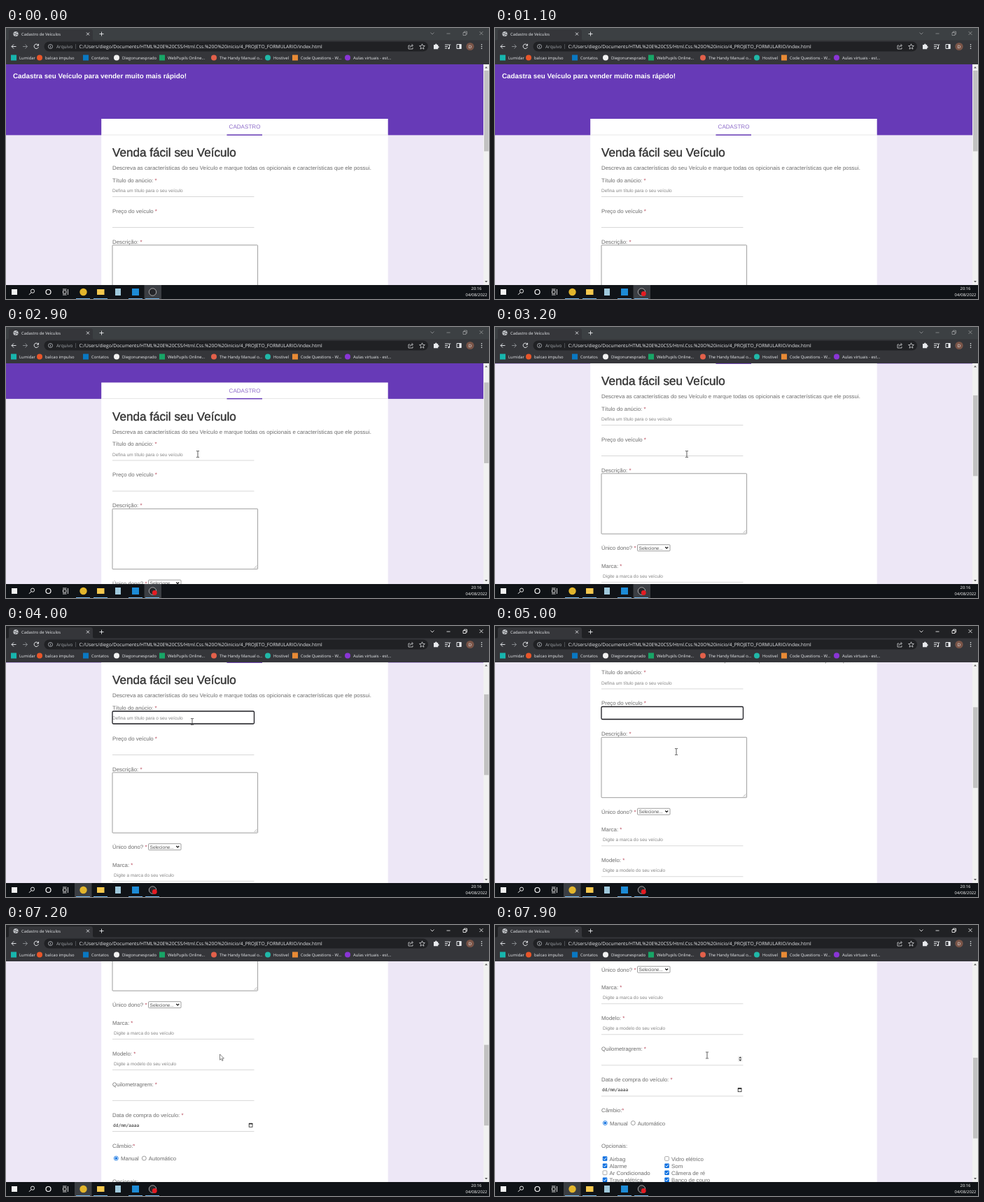
An HTML page that plays this animation: 690 by 388 pixels, repeating every 8000 ms.

```html
<!DOCTYPE html>
<html lang="pt">
<head>
<meta charset="utf-8">
<title>Cadastro de Veículos</title>
<style>
html, body { margin: 0; height: 100%; overflow: hidden; background: #202124; }
svg { display: block; width: 690px; height: 388px; text-rendering: geometricPrecision; }
text { white-space: pre; }
.ui { font-family: "Open Sans", sans-serif; }
.page { font-family: "Liberation Sans", Arial, sans-serif; }
.mono { font-family: "DejaVu Sans Mono", monospace; }
</style>
</head>
<body>
<svg id="stage" viewBox="0 0 690 388"></svg>
<script>
const rect = (x, y, w, h, fill, more = '') =>
  `<rect x="${x}" y="${y}" width="${w}" height="${h}" fill="${fill}" ${more}/>`;
const disc = (x, y, r, fill, more = '') =>
  `<circle cx="${x}" cy="${y}" r="${r}" fill="${fill}" ${more}/>`;
const line = (d, color, width = 1, more = '') =>
  `<path d="${d}" fill="none" stroke="${color}" stroke-width="${width}" ${more}/>`;
const shape = (d, fill, more = '') => `<path d="${d}" fill="${fill}" ${more}/>`;
// cy is the middle of the capitals
const text = (x, cy, size, fill, str, more = '') =>
  `<text x="${x}" y="${cy + size * 0.36}" font-size="${size}" fill="${fill}" ${more}>${str}</text>`;

const PURPLE = '#673ab7', LIGHT = '#e8eaed', TOOLBAR = '#35363a', BLUE = '#0b6fe0';
const INK = '#6c6c6c', BODY = 7.88, SMALL = 6.53;

// ---- form page, drawn at scroll 0 ----
const body = (x, y, str) => text(x, y, BODY, INK, str);
const label = (y, str) => body(152, y, `${str}<tspan fill="#b8485a"> *</tspan>`);
const rule = y => rect(152, y - 0.4, 202.5, 0.8, '#cfcfcf');
const hint = (x, y, str) => text(x, y, SMALL, '#858585', str);

function check(x, y, on, str) {
  const box = on
    ? rect(x - 3.2, y - 3.2, 6.5, 6.5, BLUE, 'rx="1"') +
      line(`M${x - 2} ${y}l1.5 1.6 2.7-3.2`, '#fff', 1)
    : rect(x - 2.9, y - 2.9, 5.8, 5.8, '#fff', 'rx="1" stroke="#767676" stroke-width=".6"');
  return box + body(x + 6.5, y + 0.3, str);
}

const spinner = (id, y) => `<g id="${id}">` +
  rect(347, y - 4, 6.5, 8, '#efefef') +
  shape(`M348.2 ${y - 0.9}h4.2l-2.1-2.4zM348.2 ${y + 0.9}h4.2l-2.1 2.4z`, '#444') + '</g>';
const ring = (id, y) => rect(152, y, 202.5, 18, 'none',
  `id="${id}" rx="1.5" stroke="#1c1c22" stroke-width="1.3"`);

const form =
  rect(0, 52, 682, 900, '#ede7f6') +
  rect(0, 52, 682, 101.4, PURPLE) +
  text(10, 68, 9.83, '#fff', 'Cadastra seu Veículo para vender muito mais rápido!', 'font-weight="700"') +
  rect(136.2, 130, 409.5, 900, '#fff') +
  rect(136.2, 152.7, 409.5, 0.7, '#ddd') +
  text(341, 141.3, 8.08, PURPLE, 'CADASTRO', 'text-anchor="middle" opacity=".75"') +
  rect(315.5, 152.4, 50.5, 1.5, PURPLE) +
  text(152, 178, 17.1, '#333', 'Venda fácil seu Veículo', 'stroke="#333" stroke-width=".4"') +
  body(152, 200.3, 'Descreva as características do seu Veículo e marque todas os opicionais e características que ele possui.') +
  label(218, 'Título do anúcio:') + hint(152, 232.8, 'Defina um título para o seu veículo') + rule(241.5) +
  label(262, 'Preço do veículo') + rule(285.5) +
  label(306, 'Descrição:') +
  rect(152, 310.8, 207.6, 86.4, '#fff', 'rx=".8" stroke="#858585" stroke-width=".8"') +
  line('M354.5 396l4-4M357 396l1.5-1.5', '#777', 0.5) +
  label(417.5, 'Único dono?') +
  rect(203.5, 412.7, 46.5, 9, '#fff', 'rx="1" stroke="#767676" stroke-width=".7"') +
  text(205.5, 417.5, 6.6, '#555', 'Selecione...') +
  line('M243.2 416l2 2 2-2', '#111', 1.1) +
  label(443, 'Marca:') + hint(154, 457.3, 'Digite a marca do seu veículo') + rule(466.3) +
  label(487, 'Modelo:') + hint(154, 501.3, 'Digite a modelo do seu veículo') + rule(510.3) +
  label(530.8, 'Quilometragrem:') + rule(554.3) +
  label(574.8, 'Data de compra do veículo:') +
  text(153, 589.5, 6.2, '#222', 'dd/mm/aaaa', 'class="mono"') +
  rect(347.2, 587.4, 4.8, 4.8, 'none', 'stroke="#222" stroke-width=".8"') +
  rect(347, 586.7, 5.2, 1.6, '#222') + rule(598.5) +
  body(152, 618.7, 'Câmbio:<tspan fill="#b8485a">*</tspan>') +
  disc(157.3, 637, 3, '#fff', `stroke="${BLUE}" stroke-width=".8"`) + disc(157.3, 637, 1.8, BLUE) +
  body(164, 637.3, 'Manual') +
  disc(197.3, 637, 3, '#fff', 'stroke="#767676" stroke-width=".7"') +
  body(203.8, 637.3, 'Automático') +
  body(152, 670, 'Opcionais:') +
  [['Airbag', 1, 'Vidro elétrico', 0], ['Alarme', 1, 'Som', 1],
   ['Ar Condicionado', 0, 'Câmera de ré', 1], ['Trava elétrica', 1, 'Banco de couro', 1]]
    .map(([a, aOn, b, bOn], i) =>
      check(157, 688 + i * 10.1, aOn, a) + check(245.5, 688 + i * 10.1, bOn, b)).join('') +
  ring('titleRing', 223) + ring('priceRing', 267) +
  spinner('priceSpin', 276) + spinner('kmSpin', 545.2);

// ---- browser frame ----
const bookmarks = [
  [7, 'Lumidar', '#17b5ad', 1], [44, 'balcao impulso', '#e8562a'], [110, 'Contatos', '#0a78c2', 1],
  [154, 'Diegonunesprado', '#f2f2f2'], [219, 'WebPupils Online...', '#18a566', 1],
  [293, 'The Handy Manual o...', '#e2604a'], [370, 'Hostivel', '#20b8a8'],
  [409, 'Code Questions - W...', '#e88a35', 1], [484, 'Aulas virtuais - est...', '#8a35d6']
].map(([x, str, color, square]) =>
  (square ? rect(x, 38.5, 8, 8, color) : disc(x + 4, 42.5, 4, color)) +
  text(x + 12, 42.6, 5.9, LIGHT, str)).join('');

const browser =
  rect(0, 0, 690, 18, '#3c4043', 'id="strip"') +
  shape('M1 18q3 0 3-3V5q0-3 3-3h114q3 0 3 3v10q0 3 3 3z', TOOLBAR) +
  rect(0, 17.5, 690, 34.5, TOOLBAR) +
  disc(14, 8.5, 3.6, '#c4c7cb') + line('M11 8h3l2-2M13 11.5l1-2 3 0', TOOLBAR, 0.7) +
  text(22, 8.6, 5.8, LIGHT, 'Cadastro de Veículos') +
  line('M115 6.5l4 4m0-4l-4 4M133.5 8.5h6m-3-3v6', LIGHT, 0.9) +
  `<g id="buttons">` + line('M606.5 6.5l2.5 2.5 2.5-2.5M629.5 8h5M653 6.5h4v4h-4zM654.5 6.5V5h4v4H657M676.5 5l5 5m0-5l-5 5', '#fff', 0.8) + '</g>' +
  line('M14.5 26.5H8m3-3l-3 3 3 3', '#dfe1e5') +
  line('M24 26.5h6.5m-3-3l3 3-3 3', '#85888c') +
  line('M46 24.5a3.2 3.2 0 1 0 .4 2.8M46.5 22.8v2.4h-2.4', LIGHT) +
  rect(54.5, 19.5, 548.5, 14, '#202124', 'rx="7"') +
  disc(63.5, 26.5, 3, 'none', 'stroke="#bdc1c6" stroke-width=".8"') +
  line('M63.5 26v2.2M63.5 24.6v.8', '#bdc1c6', 0.8) +
  text(72, 26.6, 6.5, '#a5a9ae', 'Arquivo') + rect(99, 23, 0.6, 7, '#6a6d72') +
  text(104.5, 26.6, 6.76, LIGHT, 'C:/Users/diego/Documents/HTML%20E%20CSS/Html.Css.%20O%20inicio/4_PROJETO_FORMULARIO/index.html') +
  line('M577 25h-2v5h6v-2M577 28q0-3 4-3m-1.5-2l2 2-2 2', LIGHT, 0.7) +
  line('M594.5 22.8l1.1 2.6 2.8.2-2.1 1.8.7 2.8-2.5-1.5-2.5 1.5.7-2.8-2.1-1.8 2.8-.2z', LIGHT, 0.7) +
  shape('M611 24h2q0-1.6 1.3-1.6T615.6 24h1.6v2q1.5 0 1.5 1.3t-1.5 1.3v1.6H611z', LIGHT) +
  line('M627 24h6M627 26.5h4M627 29h3M633.5 29v-5h1.8', LIGHT, 0.9) + disc(632.6, 29, 1.2, LIGHT) +
  line('M644 23.5h6v6h-6z', LIGHT) + rect(647.5, 23, 3, 7, LIGHT) +
  disc(663, 26.5, 5.6, '#7a5548') + text(663, 26.6, 6, '#fff', 'D', 'text-anchor="middle"') +
  [23.7, 26.5, 29.3].map(y => disc(679.5, y, 0.8, LIGHT)).join('') +
  bookmarks;

const scrollbar =
  rect(682, 52, 8, 316, '#f1f1f1') +
  shape('M684 57.5h4l-2-2.2zM684 362h4l-2 2.2z', '#555') +
  rect(683, 61, 6.5, 115.5, '#c1c1c1', 'id="thumb"');

// ---- taskbar ----
const taskbar =
  rect(0, 368, 690, 20, '#101317') +
  rect(98, 368, 24.5, 20, '#3b3e43', 'id="active"') +
  rect(8, 374, 8, 8, '#f2f2f2') +
  disc(38, 376.7, 2.6, 'none', 'stroke="#fff" stroke-width=".9"') + line('M36 378.8l-3 3', '#fff') +
  disc(60.5, 378, 3.5, 'none', 'stroke="#fff" stroke-width="1.2"') +
  line('M81.5 376h4.5v4h-4.5zM81 374h5.5M81 382h5.5M88.5 374v8', '#fff', 0.8) +
  disc(110.5, 378, 5.2, '#e2b52c') +
  rect(130, 374, 10.5, 8, '#f4c84e') +
  rect(156, 373, 8, 10, '#9fc9dc') +
  rect(180, 373, 10, 10, '#1c8bd6') +
  disc(209.5, 378, 5.2, '#25262a', 'stroke="#c8c8c8" stroke-width=".8"') +
  disc(212.3, 380.5, 3.4, '#e51c23', 'id="badge"') +
  [100, 125, 175, 199].map(x => rect(x, 387, 20, 1, '#76b9ed')).join('') +
  text(672, 373.4, 5.8, '#fff', '20:16', 'text-anchor="middle"') +
  text(672, 382.2, 5.8, '#fff', '04/08/2022', 'text-anchor="middle"');

const cursor =
  `<g id="beam">` + line('M-2-4.5h1.4L0-4 .6-4.5H2M-2 4.5h1.4L0 4 .6 4.5H2M0-4V4', '#333', 0.8) + '</g>' +
  shape('M0 0V8.2l1.9-1.7 1.3 2.9 1.4-.6-1.3-2.8h2.6z', '#fff', 'id="arrow" stroke="#333" stroke-width=".6"');

const stage = document.getElementById('stage');
stage.innerHTML =
  '<clipPath id="view"><path d="M0 52h682v316H0z"/></clipPath>' +
  `<g clip-path="url(#view)"><g id="form" class="page">${form}</g></g>` +
  `<g class="ui">${browser}${scrollbar}${taskbar}</g>${cursor}`;

const $ = id => document.getElementById(id);
const show = (id, on) => $(id).setAttribute('visibility', on ? 'visible' : 'hidden');
const move = (id, x, y) => $(id).setAttribute('transform', `translate(${x} ${y})`);

const LOOP = 8000, NOTCH = 50.5;
const notches = [2500, 3200, 5000, 5400, 5600, 7200, 7400];
const path = [
  [1900, 209, 374], [2300, 274, 182], [3200, 274, 182], [3700, 266, 137], [4000, 266, 137],
  [4400, 259, 180], [5900, 259, 180], [6300, 228, 164], [6700, 228, 164], [7000, 305.5, 185],
  [7600, 305.5, 185], [7800, 303, 186.5], [LOOP, 303, 186.5]
];

function pointer(t) {
  const i = path.findIndex(p => p[0] > t);
  if (i < 1) return path[0].slice(1);
  const [t0, x0, y0] = path[i - 1], [t1, x1, y1] = path[i];
  const k = (t - t0) / (t1 - t0), e = k * k * (3 - 2 * k);
  return [x0 + (x1 - x0) * e, y0 + (y1 - y0) * e];
}

function draw(now) {
  const t = Math.floor(now % LOOP / 100) * 100;
  const during = (a, b = LOOP) => t >= a && t < b;
  const scroll = NOTCH * notches.filter(n => n <= t).length;
  const focused = t >= 3800;
  const arrow = during(1900, 2200) || during(6100, 7700);
  const [x, y] = pointer(t);

  move('form', 0, -scroll);
  move('thumb', 0, scroll * 0.365);
  move('beam', x, y);
  move('arrow', x, y);
  show('arrow', arrow);
  show('beam', t >= 1900 && !arrow);
  show('titleRing', during(3800, 4600));
  show('priceRing', during(4600));
  show('priceSpin', during(4300, 5000));
  show('kmSpin', during(7700));
  show('badge', during(1000));
  move('active', focused ? 0 : 99.5, 0);
  $('strip').setAttribute('fill', focused ? '#202124' : '#3c4043');
  $('buttons').setAttribute('opacity', focused ? 1 : 0.45);
  requestAnimationFrame(draw);
}
requestAnimationFrame(draw);
</script>
</body>
</html>
```
